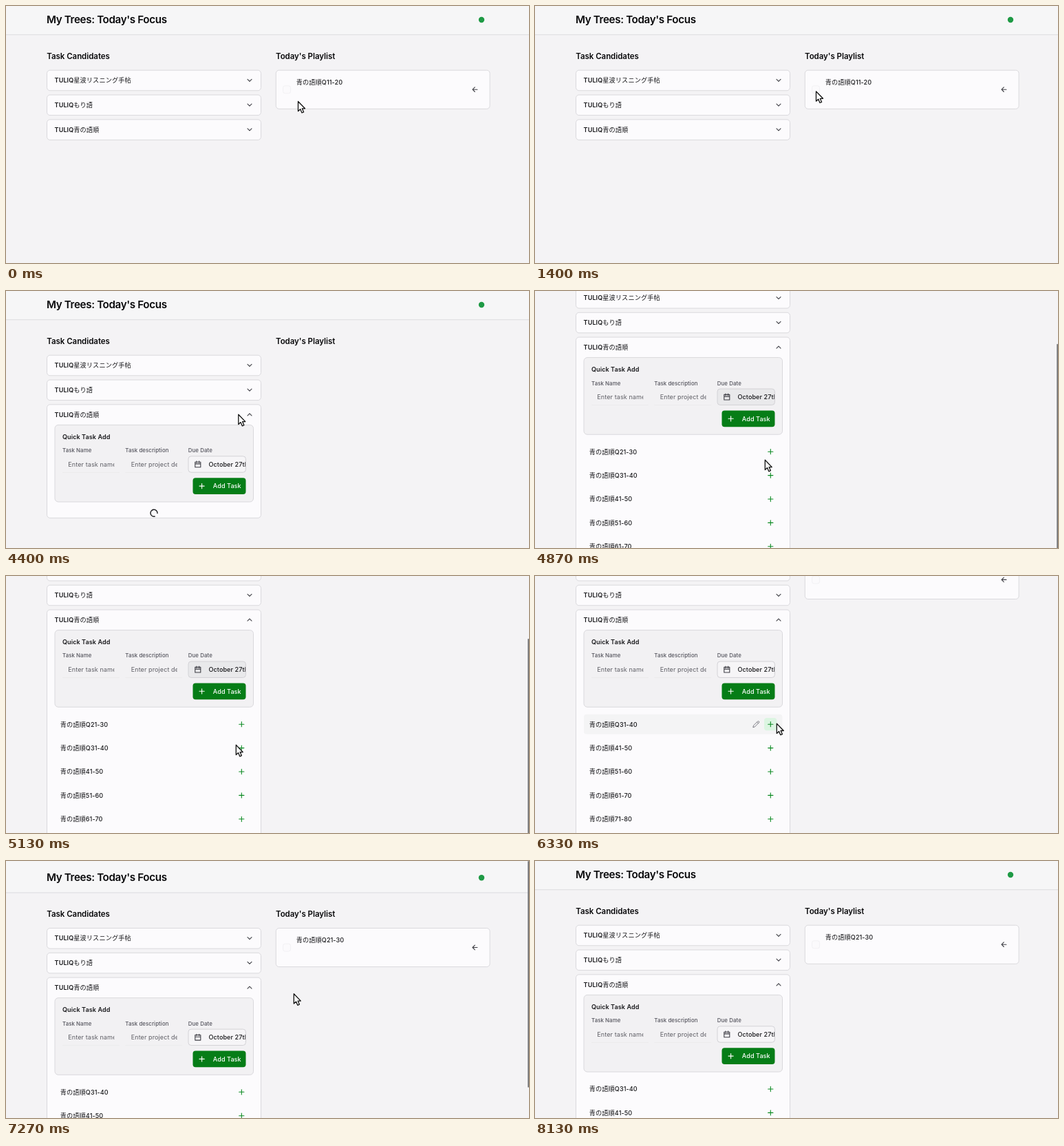
An HTML page for the animation above (8190 ms loop, 760 px wide and 373 px high).

```html
<!DOCTYPE html>
<html lang="en">
<head>
<meta charset="utf-8">
<title>Today's Focus</title>
<style>
  html, body { margin: 0; width: 100%; height: 100%; overflow: hidden; background: #f4f3f5; }
  svg { display: block; width: 760px; height: 373px; }
  text { font: 400 9.05px Inter, "Noto Sans CJK JP", "Noto Sans CJK", sans-serif; letter-spacing: .08px; fill: #18181b; white-space: pre; }
  .title { font-size: 15.2px; font-weight: 600; letter-spacing: -.36px; fill: #09090b; }
  .head { font-size: 11.5px; font-weight: 600; letter-spacing: -.05px; fill: #09090b; }
  .mid { font-weight: 500; }
  .bold { font-weight: 600; }
  .label { font-size: 7.85px; font-weight: 500; fill: #52525b; }
  .hint { fill: #5f5f66; }
  .ja { font-size: 9.2px; font-weight: 400; letter-spacing: .1px; }
  .card { fill: #fcfbfd; stroke: #dad9dd; }
  .line { fill: none; stroke: #3f3f46; stroke-width: 1.1; stroke-linecap: round; stroke-linejoin: round; }
  .green { stroke: #0b8a22; }
</style>
</head>
<body>
<svg id="stage" viewBox="0 0 760 373" xmlns="http://www.w3.org/2000/svg"></svg>
<script>
const LOOP = 8190;
const COURSE = '青の語順';
const ROW_TOP = 331, PITCH = 34.4, SCROLL = 115.8;
const T = { done: 1600, open: 4230, loaded: 4600, moved: 6070 };

const stage = document.getElementById('stage');

function el(parent, tag, attrs = {}, text) {
  const node = document.createElementNS('http://www.w3.org/2000/svg', tag);
  set(node, attrs);
  if (text) node.textContent = text;
  parent.appendChild(node);
  return node;
}
function set(node, attrs) {
  for (const key in attrs) node.setAttribute(key, attrs[key]);
}
const group = (parent, attrs) => el(parent, 'g', attrs);
const show = (node, on) => node.setAttribute('visibility', on ? 'visible' : 'hidden');
const at = (x, y) => ({ transform: `translate(${x} ${y})` });

function box(parent, x, y, width, height, rx, attrs = {}) {
  return el(parent, 'rect', { x, y, width, height, rx, ...attrs });
}
function label(parent, x, y, text, cls = '') {
  return el(parent, 'text', { x, y, class: cls }, text);
}
function mixed(parent, x, y, latin, ja, tail = '') {
  const node = el(parent, 'text', { x, y });
  if (latin) el(node, 'tspan', { class: 'bold' }, latin);
  el(node, 'tspan', { class: 'ja' }, ja);
  el(node, 'tspan', { class: 'mid' }, tail);
  return node;
}
function icon(parent, x, y, d, attrs = {}) {
  const g = group(parent, at(x, y));
  return el(g, 'path', { d, class: 'line', ...attrs });
}
function clip(id, x, y, width, height) {
  const c = el(defs, 'clipPath', { id });
  return el(c, 'rect', { x, y, width, height });
}

const CHEVRON = 'M-3 -1.5L0 1.5L3 -1.5';
const PLUS = 'M-3.6 0H3.6M0 -3.6V3.6';

const defs = el(stage, 'defs');
const page = group(stage);

// Header
box(page, 0, -20, 760, 61.5, 0, { fill: '#f6f6f7' });
box(page, 0, 41.2, 760, 1, 0, { fill: '#dcdcdf' });
label(page, 59, 25.1, "My Trees: Today's Focus", 'title');
el(page, 'circle', { cx: 691, cy: 20, r: 4.2, fill: '#1f9a45' });
label(page, 59.3, 77, 'Task Candidates', 'head');
label(page, 392, 77, "Today's Playlist", 'head');

// Candidate groups
const names = ['星波リスニング手帖', 'もり語', COURSE];
let lastCard, lastChevron;
names.forEach((name, i) => {
  const y = 93.2 + i * 35.8;
  lastCard = box(page, 59.5, y, 311, 29.6, 4.5, { class: 'card' });
  mixed(page, 70.6, y + 17.8, 'TULIQ', name);
  lastChevron = icon(page, 354, y + 14.6, CHEVRON);
});

// Expanding content of the last group
const openClip = clip('open', 59, 190, 312, 0);
const content = group(page, { 'clip-path': 'url(#open)' });
box(content, 71, 194.4, 288.5, 111.6, 5, { fill: '#f2f1f3', stroke: '#d9d8dc' });
label(content, 82, 214.8, 'Quick Task Add', 'bold');
label(content, 82, 234.3, 'Task Name', 'label');
label(content, 173.3, 234.3, 'Task description', 'label');
label(content, 264.8, 234.3, 'Due Date', 'label');
clip('nameBox', 82, 240, 75.3, 24);
clip('descBox', 173, 240, 75.8, 24);
clip('dateBox', 265, 240, 83.2, 24);
for (const x of [82, 173.3])
  box(content, x, 263, 83, .8, 0, { fill: '#ebeaec' });
const field = (id, x, text, cls) =>
  label(group(content, { 'clip-path': `url(#${id})` }), x, 255, text, cls);
field('nameBox', 90.3, 'Enter task name', 'hint');
field('descBox', 181.7, 'Enter project description', 'hint');
const dateBtn = box(content, 265, 239.8, 83.4, 23.4, 4, { stroke: '#d3d2d6' });
icon(content, 278.8, 251.5, 'M-4 -3.3H4V4.3H-4ZM-4 -.6H4M-1.8 -4.6V-2.3M1.8 -4.6V-2.3');
field('dateBox', 294.5, 'October 27th, 2024', 'mid');
box(content, 271.5, 271.2, 77, 23.8, 4, { fill: '#067d17' });
icon(content, 284.6, 283.1, PLUS, { style: 'stroke:#fff' });
label(content, 300.8, 286.4, 'Add Task', 'mid').style.fill = '#fff';
const spinner = el(content, 'path', {
  d: 'M5 0A5 5 0 1 1 1.54 -4.76', class: 'line', style: 'stroke:#18181b;stroke-width:1.4'
});

// Task rows
const list = group(content);
const hover = group(list);
box(hover, 71, -14.4, 288.5, 28.8, 4, { fill: '#f4f4f5' });
const plusGlow = box(hover, 333, -9.3, 18.4, 18.4, 4, { fill: '#dcf5e2' });
const pencil = group(hover, { transform: 'translate(315.9 -5.4) scale(.45)' });
el(pencil, 'path', {
  d: 'M17 3a2.85 2.83 0 1 1 4 4L7.5 20.5 2 22l1.5-5.5ZM15 5l4 4',
  class: 'line', style: 'stroke-width:2;stroke:#71717a'
});
const tasks = [];
for (let n = 21; n < 100; n += 10) {
  const g = group(list);
  mixed(g, 78.7, 3.4, '', COURSE, `${n < 41 ? 'Q' : ''}${n}-${n + 9}`);
  icon(g, 342.3, 0, PLUS, { class: 'line green' });
  tasks.push(g);
}

// Playlist card
const playlist = group(page);
box(playlist, 392.3, 93.2, 310.8, 56.1, 4.5, { class: 'card' });
box(playlist, 402.6, 115.8, 11, 11, 3, { fill: '#fbfafc', stroke: '#f2f1f4' });
const queued = ['Q11-20', 'Q21-30'].map(q => mixed(playlist, 421.7, 113.9, '', COURSE, q));
icon(playlist, 681.5, 121.2, 'M3.4 0H-3.4M-.2 -3.3L-3.5 0L-.2 3.3');

const bar = box(stage, 758.2, 0, 1.8, 333, .9, { fill: '#77777a' });
const cursor = el(stage, 'path', {
  d: 'M0 0V14.2L3.2 11.3L5.5 16.5L8.1 15.4L5.8 10.3H10Z',
  fill: '#fff', stroke: '#111', 'stroke-width': 1.3, 'stroke-linejoin': 'round'
});

const smooth = u => u * u * (3 - 2 * u);
const easeOut = u => 1 - (1 - u) ** 3;
const part = (t, a, b) => Math.min(1, Math.max(0, (t - a) / (b - a)));

// Pointer stops: time, x, y
const path = [
  [0, 424.5, 138.5], [100, 424.5, 138.5], [930, 412.5, 128], [1400, 408.5, 124],
  [3140, 408.5, 124], [3200, 391.7, 125.3], [3470, 345.7, 150.5], [3890, 345.7, 150.5],
  [4070, 337.8, 179.3], [4400, 337.8, 179.3], [4660, 334.3, 245.3], [5190, 334.3, 245.3],
  [5800, 342, 213], [6120, 342, 213], [6330, 351.3, 214.2], [6480, 351.3, 214.2],
  [6760, 418.3, 192.8], [7270, 418.3, 192.8], [7650, 560, -25], [LOOP, 560, -25]
];
function pointer(t) {
  let i = 1;
  while (path[i][0] < t) i++;
  const [t0, x0, y0] = path[i - 1], [t1, x1, y1] = path[i];
  const u = smooth(part(t, t0, t1));
  return [x0 + (x1 - x0) * u, y0 + (y1 - y0) * u];
}
function scrollAt(t) {
  const travel = SCROLL * (easeOut(part(t, 4700, 5070)) - smooth(part(t, 6770, 7130)));
  const bounce = 4.3 * (smooth(part(t, 7130, 7270)) - smooth(part(t, 7270, 7650)));
  return travel - bounce;
}

function draw(t) {
  const [cx, cy] = pointer(t);
  const scroll = scrollAt(t);
  const loaded = t >= T.loaded, moved = t >= T.moved;
  const opened = easeOut(part(t, T.open, 4400));

  set(page, at(0, -scroll));
  set(cursor, at(cx, cy));

  const height = loaded ? 480 : 29.6 + 135 * opened;
  lastCard.setAttribute('height', height);
  openClip.setAttribute('height', t < T.open ? 0 : height - 25.7);
  set(lastChevron, { transform: `rotate(${180 * opened})` });
  show(content, t >= T.open);
  show(spinner, t >= T.open && !loaded);
  set(spinner, { transform: `translate(215 322.3) rotate(${(t - 4400) * .36 + 75})` });
  dateBtn.setAttribute('fill', t > 4580 && t < 5200 ? '#e9e9eb' : '#f6f5f7');

  tasks.forEach((g, i) => {
    const slot = moved ? i - 1 : i;
    set(g, at(0, ROW_TOP + slot * PITCH));
    show(g, loaded && slot >= 0);
  });

  const row = Math.round((cy + scroll - ROW_TOP) / PITCH);
  const rowY = ROW_TOP + row * PITCH;
  const offset = Math.abs(cy + scroll - rowY);
  const over = t > 5200 && t < 6760 && row >= 0 && cx > 71 && cx < 359 && offset < 14.4;
  set(hover, at(0, rowY));
  hover.setAttribute('display', over ? 'inline' : 'none');
  plusGlow.setAttribute('display', Math.abs(cx - 342.3) < 9.5 && offset < 9.5 ? 'inline' : 'none');

  playlist.setAttribute('display', t < T.done || moved ? 'inline' : 'none');
  show(queued[0], t < T.done);
  show(queued[1], moved);

  const fade = t < 6500
    ? part(t, 4690, 4740) - part(t, 5650, 5900)
    : part(t, 6765, 6800) - part(t, 7500, 7660);
  set(bar, {
    opacity: fade,
    y: Math.max(0, scroll) * .785,
    height: 333 + Math.min(0, scroll)
  });
}

const start = performance.now();
function tick() {
  draw((performance.now() - start) % LOOP);
  requestAnimationFrame(tick);
}
draw(0);
requestAnimationFrame(tick);
</script>
</body>
</html>
```
